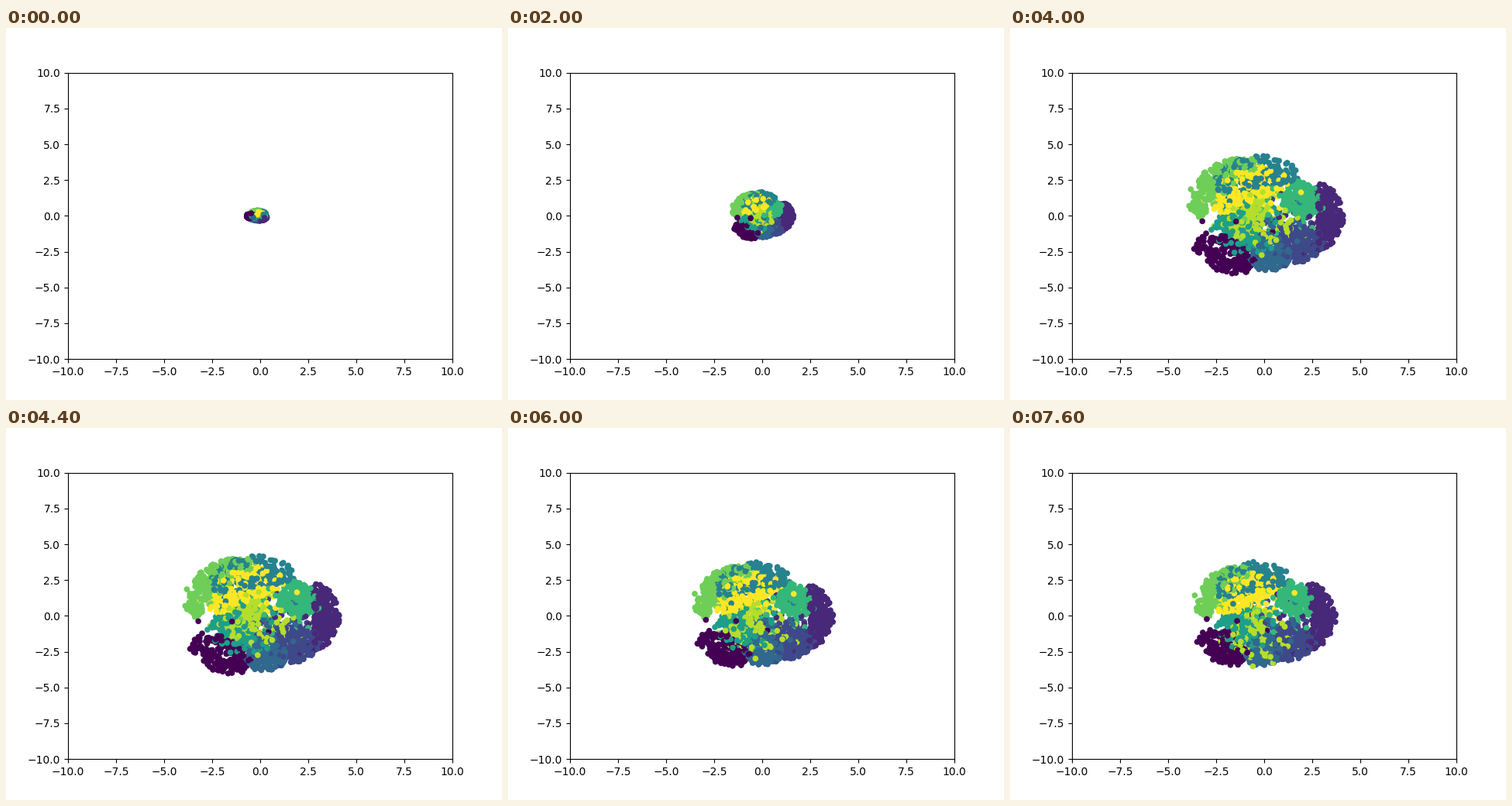
Recreate the animation shown at these times as a matplotlib script. Size 640x480 px, loop 8 s.

```python
import numpy as np
import matplotlib.pyplot as plt
from matplotlib.animation import FuncAnimation

rng = np.random.default_rng(7)

CLOUD_RADII = np.array([99 / 24.8, 77 / 18.48])  # in axis units
COUNT = 2200
BURST = 10  # step at which the small cloud expands
STEPS = 20

# Each class is a rounded lobe: middle angle, half angle, middle radius, half radius.
LOBES = np.array([
    (231, 30, .83, .27),
    (-2, 39, .87, .17),
    (-45, 28, .65, .30),
    (-82, 25, .62, .32),
    (100, 47, .74, .28),
    (220, 45, .48, .22),
    (28, 32, .57, .25),
    (138, 44, .86, .22),
    (225, 130, .28, .25),
    (118, 58, .58, .30),
])

labels = rng.integers(0, len(LOBES), COUNT)
mid_angle, half_angle, mid_radius, half_radius = LOBES[labels].T


def unit_disc():
    return np.sqrt(rng.random(COUNT)) * np.exp(2j * np.pi * rng.random(COUNT))


# Positions are complex numbers on a unit cloud.
disc = unit_disc()
angle = np.radians(mid_angle + half_angle * disc.real)
radius = mid_radius + half_radius * disc.imag
spread = radius * np.exp(1j * angle)

# Some points, mostly of the inner classes, stray into their neighbours.
stray = rng.random(COUNT) < 0.5 * (1 - mid_radius)
spread = np.where(stray, 0.6 * spread + 0.45 * unit_disc(), spread)

# Later the cloud turns to the left along its rim, while class 8 sinks.
settled = spread * np.exp(1j * np.radians(9) * np.sin(np.angle(spread)))
settled -= 0.32j * (labels == 8)

start = spread * np.exp(-1j * np.pi / 4)
wander = 0.002 * unit_disc()


def positions(step):
    if step == 0:
        z = -0.035 + 0.13 * start.real + 0.085j * start.imag
    elif step < BURST:
        z = 0.39 * spread + wander * step
    else:
        age = max(step - BURST - 1, 0)
        mix = age / (STEPS - BURST - 2)
        scale = 0.89 + 0.11 * np.exp(-1.2 * age)
        z = scale * ((1 - mix) * spread + mix * settled) + 2 * wander * age
    return np.column_stack([z.real, z.imag]) * CLOUD_RADII


fig, ax = plt.subplots(figsize=(6.4, 4.8), dpi=100)
ax.set_xlim(-10, 10)
ax.set_ylim(-10, 10)
dots = ax.scatter(*positions(0).T, s=20, c=labels, cmap="viridis")


def update(step):
    dots.set_offsets(positions(step))
    return dots,


anim = FuncAnimation(fig, update, frames=STEPS, interval=400, repeat=True, repeat_delay=0)
plt.show()
```
